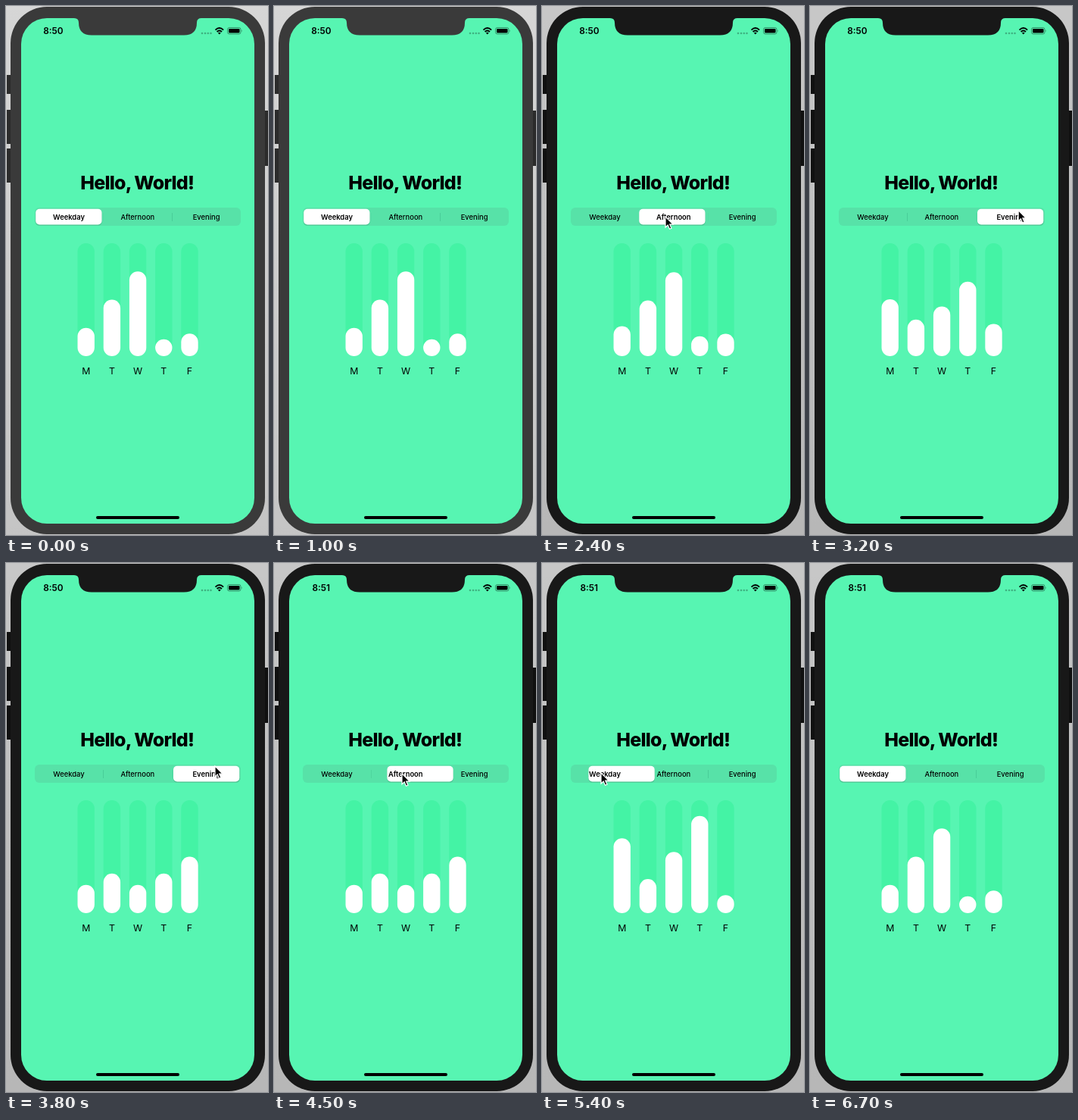
An HTML page that plays this animation: 346x698 px, repeating every 6800 ms.

```html
<!DOCTYPE html>
<html lang="en">
<head>
<meta charset="utf-8">
<title>Bar chart</title>
<style>
  html, body { margin: 0; width: 100%; height: 100%; overflow: hidden; background: #ccc; }
  svg { display: block; font-family: Inter, sans-serif; text-anchor: middle; }
  #title { font-size: 25px; font-weight: 800; letter-spacing: -.8px; }
  #clock { font-size: 11.8px; font-weight: 600; }
  #tabs { font-size: 9.4px; font-weight: 500; }
  #days { font-size: 12.3px; }
</style>
</head>
<body>
<svg width="346" height="698" viewBox="0 0 346 698">
  <defs>
    <linearGradient id="shade" x2="0" y2="1">
      <stop stop-color="#000" stop-opacity=".02"/>
      <stop offset="1" stop-color="#000" stop-opacity=".1"/>
    </linearGradient>
  </defs>
  <rect id="desk" width="346" height="698"/>
  <rect width="346" height="698" fill="url(#shade)"/>
  <path id="keys" d="M1 91h5v25H1zM1 137h5v45H1zM1 188h5v45H1zM342 138h4v73h-4z"/>
  <rect id="shell" x="6" y="1" width="336" height="696" rx="48"/>
  <rect x="20" y="16" width="308" height="667" rx="34" fill="#57f5b2"/>
  <path id="notch" d="M90 15.5H258V16Q252 16 252 22Q252 38.500 235 38.500H113Q96 38.500 96 22Q96 16 90 16Z"/>

  <text id="clock" x="62.300" y="37"></text>
  <g fill-opacity=".28">
    <circle cx="259" cy="36" r="1.300"/><circle cx="263" cy="36" r="1.300"/>
    <circle cx="266.800" cy="36" r="1.300"/><circle cx="270.500" cy="36" r="1.300"/>
  </g>
  <g fill="none" stroke="#000" stroke-width="1.900">
    <path d="M276.500 31.600Q281.800 26.600 287.100 31.600M278.600 34Q281.800 31 285 34"/>
  </g>
  <path d="M281.800 37.400L279.900 35.500Q281.800 33.900 283.700 35.500Z"/>
  <rect x="292.500" y="28.500" width="17.500" height="8.500" rx="2.500" fill="none" stroke="#000" stroke-opacity=".4"/>
  <rect x="294" y="30" width="14.500" height="5.500" rx="1.300"/>
  <path d="M311 31.200q1.400 1.500 0 3z" fill-opacity=".45"/>

  <text id="title" x="173.200" y="241.500">Hello, World!</text>
  <rect x="38" y="266" width="272" height="24" rx="6" fill="#57e2a8"/>
  <path class="sep" d="M128.500 273v11" stroke="#45c795"/>
  <path class="sep" d="M219.500 273v11" stroke="#45c795"/>
  <g id="pill">
    <rect x="-.3" y="268.300" width="88" height="21.500" rx="5.500" fill-opacity=".13"/>
    <rect y="267.700" width="87.300" height="20.800" rx="5" fill="#fff"/>
  </g>
  <g id="tabs"></g>
  <g id="chart"></g>
  <g id="days"></g>
  <rect x="119" y="673" width="110" height="4" rx="2"/>

  <g id="cursor">
    <g id="ring" fill="none">
      <circle cx="1" cy="2" r="20.300" stroke="#fff" stroke-opacity=".75" stroke-width="5"/>
      <circle cx="1" cy="2" r="20.300" stroke="#000" stroke-width="3"/>
    </g>
    <path d="M0 0V14L3.200 11L5.500 16.300L7.900 15.300L5.700 10.200H10Z" stroke="#fff" stroke-width="1.200"/>
  </g>
</svg>
<script>
const LOOP = 6800, ACTIVE = 2100, TICK = 4100, HIDE = 6000;
const BASE = 462, SCALE = .745;
const data = [[50, 100, 150, 30, 40], [135, 60, 110, 175, 30], [50, 70, 50, 70, 100]];
const pillX = [39.2, 130, 221];
// start of each selection, and the chosen segment
const taps = [[2145, 1], [2640, 2], [4360, 1], [5270, 0]];
// pointer: time, x, y
const path = [[1300, 300, -18], [1850, 163, 278], [2420, 163, 278], [2580, 272, 277],
  [3000, 275, 270], [3800, 276, 268], [4000, 276, 268], [4200, 174, 278],
  [4450, 174, 278], [4800, 87, 276], [5000, 87, 276], [5200, 78, 277]];

const $ = id => document.getElementById(id);
const clamp = p => Math.max(0, Math.min(1, p));
const smooth = p => (p = clamp(p), p * p * (3 - 2 * p));
const easeOut = p => 1 - (1 - clamp(p)) ** 3;

function add(parent, tag, attrs, text = '') {
  const el = document.createElementNS('http://www.w3.org/2000/svg', tag);
  for (const k in attrs) el.setAttribute(k, attrs[k]);
  el.textContent = text;
  return $(parent).appendChild(el);
}

const tabs = ['Weekday', 'Afternoon', 'Evening'].map((s, i) =>
  add('tabs', 'text', { x: 83 + 90.8 * i, y: 281.6 }, s));
const bars = [...'MTWTF'].map((s, i) => {
  const x = 94.5 + 34.2 * i, box = { x, width: 22.4, rx: 11.2 };
  add('chart', 'rect', { ...box, y: 313, height: 149, fill: '#44f3a5' });
  add('days', 'text', { x: x + 11.2, y: 486 }, s);
  return add('chart', 'rect', { ...box, fill: '#fff' });
});
const seps = document.querySelectorAll('.sep');

// Overlapping changes add up, so a new choice blends into the running one.
function blend(t, value, ease, duration, delay = 0) {
  let sum = value(0), last = 0;
  for (const [start, tab] of taps) {
    sum += (value(tab) - value(last)) * ease((t - start - delay) / duration);
    last = tab;
  }
  return sum;
}

function pointer(t) {
  const n = path.findIndex(k => k[0] > t);
  if (n < 1) return path[n < 0 ? path.length - 1 : 0].slice(1);
  const [a, b] = [path[n - 1], path[n]], p = smooth((t - a[0]) / (b[0] - a[0]));
  return [1, 2].map(i => a[i] + (b[i] - a[i]) * p);
}

function draw(t) {
  const active = t >= ACTIVE, frame = active ? '#181818' : '#3a3a3a';
  $('desk').setAttribute('fill', active ? '#cbcbcb' : '#dadada');
  $('shell').setAttribute('fill', frame);
  $('notch').setAttribute('fill', frame);
  $('keys').setAttribute('fill', active ? '#101010' : '#2b2b2b');
  $('clock').textContent = t < TICK ? '8:50' : '8:51';

  const x = blend(t, tab => pillX[tab], easeOut, 350);
  $('pill').setAttribute('transform', `translate(${x} 0)`);
  seps.forEach((s, i) => {
    const gap = Math.abs(x + 43.6 - (128.5 + 91 * i));
    s.setAttribute('opacity', .15 + .6 * clamp((gap - 48) / 30));
  });
  const selected = taps.reduce((now, [start, tab]) => t >= start ? tab : now, 0);
  tabs.forEach((el, i) => el.setAttribute('style', `font-weight:${i === selected ? 600 : 500}`));

  bars.forEach((bar, i) => {
    const h = SCALE * blend(t, tab => data[tab][i], smooth, 1000, 140);
    bar.setAttribute('y', BASE - h);
    bar.setAttribute('height', h);
  });

  const shown = t >= path[0][0] && t < HIDE;
  $('cursor').setAttribute('visibility', shown ? 'visible' : 'hidden');
  $('cursor').setAttribute('transform', `translate(${pointer(t)})`);
  const pressed = taps.some(([start]) => t >= start - 200 && t < start - 45);
  $('ring').setAttribute('opacity', pressed ? 1 : 0);
}

const begin = performance.now();
function tick() {
  draw((performance.now() - begin) % LOOP);
  requestAnimationFrame(tick);
}
tick();
</script>
</body>
</html>
```
